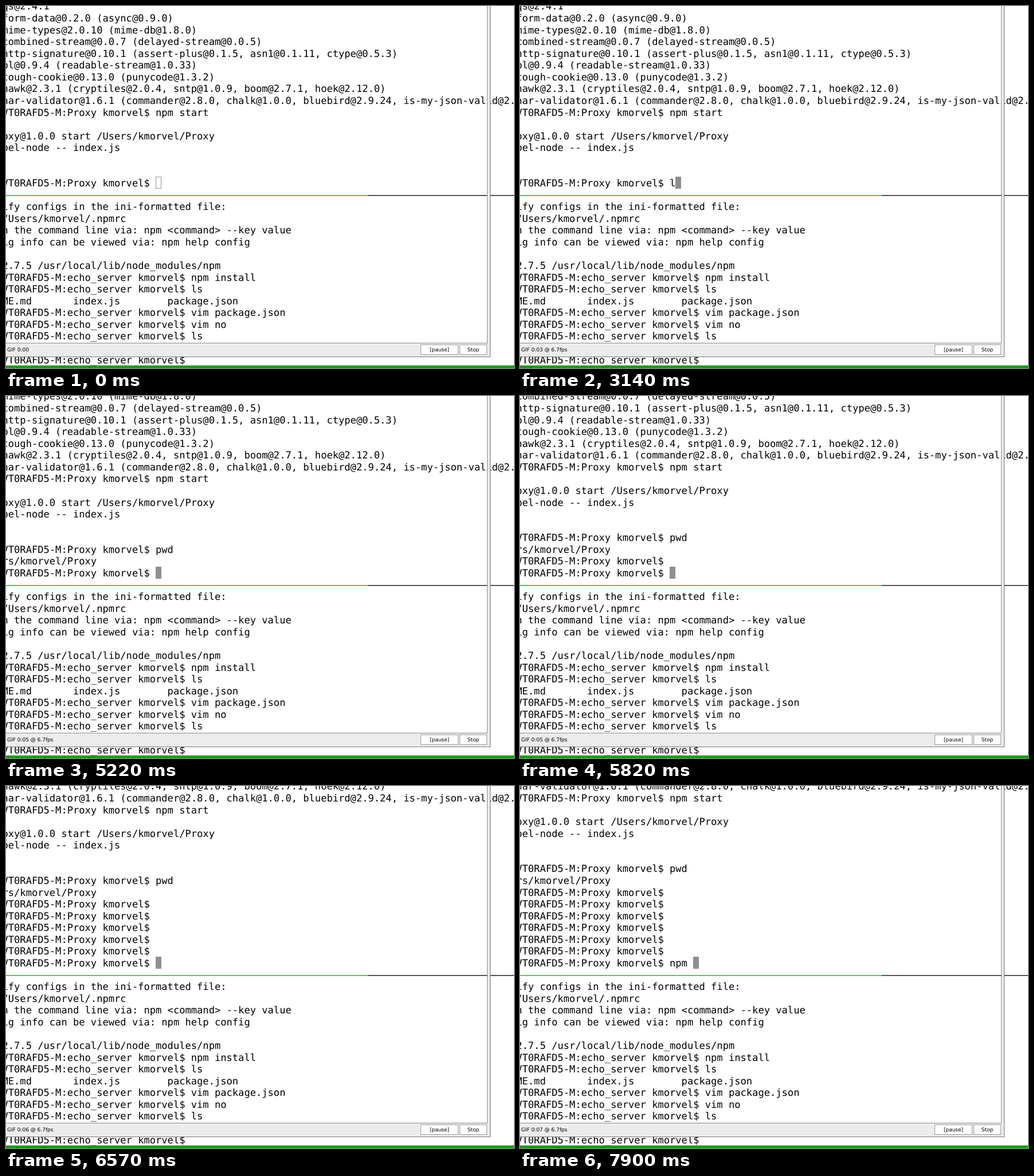
Animation, 886 px wide and 632 px high, one loop 8000 ms. Source, as an HTML page with a canvas:

```html
<!DOCTYPE html>
<html lang="en">
<head>
<meta charset="utf-8">
<title>Terminal recording</title>
<style>
  html, body { margin: 0; width: 100%; height: 100%; overflow: hidden; background: #fff; }
  canvas { display: block; width: 886px; height: 632px; }
</style>
</head>
<body>
<canvas id="stage" width="886" height="632"></canvas>
<script>
const ctx = document.getElementById('stage').getContext('2d');
const LOOP = 8000;
const CELL = 10.29, LINE = 20.57;   // terminal grid
const LEFT = -6.5, BASE = 315;      // first column, baseline of the input row

const USER = 'kmorvel';
const prompt = dir => `VT0RAFD5-M:${dir} ${USER}$ `;
const PROXY = prompt('Proxy'), ECHO = prompt('echo_server');

const history = [
  'qs@2.4.1',
  'form-data@0.2.0 (async@0.9.0)',
  'mime-types@2.0.10 (mime-db@1.8.0)',
  'combined-stream@0.0.7 (delayed-stream@0.0.5)',
  'http-signature@0.10.1 (assert-plus@0.1.5, asn1@0.1.11, ctype@0.5.3)',
  'bl@0.9.4 (readable-stream@1.0.33)',
  'tough-cookie@0.13.0 (punycode@1.3.2)',
  'hawk@2.3.1 (cryptiles@2.0.4, sntp@1.0.9, boom@2.7.1, hoek@2.12.0)',
  'har-validator@1.6.1 (commander@2.8.0, chalk@1.0.0, bluebird@2.9.24, is-my-json-valid@2.',
  PROXY + 'npm start',
  '',
  `oxy@1.0.0 start /Users/${USER}/Proxy`,
  'bel-node -- index.js',
  '',
  ''
];

const lowerPane = [
  'ify configs in the ini-formatted file:',
  `/Users/${USER}/.npmrc`,
  'n the command line via: npm <command> --key value',
  'ig info can be viewed via: npm help config',
  '',
  '2.7.5 /usr/local/lib/node_modules/npm',
  ECHO + 'npm install',
  ECHO + 'ls',
  'ME.md       index.js        package.json',
  ECHO + 'vim package.json',
  ECHO + 'vim no',
  ECHO + 'ls',
  '',
  ECHO
];

// [time, key]: '<' is backspace, '\n' is enter
const keys = [
  [3140, 'l'], [3290, 's'], [3740, '<'], [4190, '<'],
  [4780, 'p'], [4930, 'w'], [5070, 'd'], [5220, '\n'],
  [5820, '\n'], [6120, '\n'], [6270, '\n'], [6420, '\n'], [6570, '\n'], [6860, '\n'],
  [7310, 'n'], [7460, 'p'], [7600, 'm'], [7900, ' ']
];

function shellAt(t) {
  const lines = [...history];
  let input = '';
  for (const [time, key] of keys) {
    if (time > t) break;
    if (key === '<') input = input.slice(0, -1);
    else if (key === '\n') {
      lines.push(PROXY + input);
      if (input === 'pwd') lines.push(`rs/${USER}/Proxy`);
      input = '';
    } else input += key;
  }
  return { lines, input };
}

function rect(x, y, w, h, color) {
  ctx.fillStyle = color;
  ctx.fillRect(x, y, w, h);
}

function frame(x, y, w, h, color) {
  ctx.strokeStyle = color;
  ctx.lineWidth = 1;
  ctx.strokeRect(x + .5, y + .5, w - 1, h - 1);
}

function row(text, index) {
  ctx.font = '17.09px "DejaVu Sans Mono", monospace';
  ctx.textAlign = 'left';
  ctx.fillStyle = '#000';
  [...text].forEach((ch, col) => ctx.fillText(ch, LEFT + col * CELL, BASE + index * LINE));
}

function label(text, x, align) {
  ctx.font = '9px "DejaVu Sans", sans-serif';
  ctx.textAlign = align;
  ctx.fillStyle = '#000';
  ctx.fillText(text, x, 603);
}

function button(text, x, w) {
  rect(x, 591, w, 18, '#fff');
  frame(x, 591, w, 18, '#999');
  label(text, x + w / 2, 'center');
}

function drawTerminal(t) {
  const { lines, input } = shellAt(t);
  lines.slice(-15).forEach((line, i) => row(line, i - 15));
  row(PROXY + input, 0);

  const cursorX = Math.round(LEFT + (PROXY + input).length * CELL);
  if (t < 1490) frame(cursorX, 298, 10, 21, '#929292');
  else rect(cursorX, 298, 10, 21, '#8f8f8f');

  rect(0, 330, 631, 1.5, '#2db52d');
  rect(631, 330, 255, 1.5, '#222');
  lowerPane.forEach((line, i) => row(line, i + 2));
  rect(0, 627.5, 886, 5, '#08a408');
  row('] 0:bash- 1:node*', 16);
}

function drawRecorder(t) {
  rect(839, 0, 6, 613, '#ececec');
  rect(0, 588, 845, 25, '#ececec');
  rect(839, 0, 1, 589, '#8c8c8c');
  rect(844, 0, 1, 613, '#777');
  rect(0, 588, 840, 1, '#8c8c8c');
  rect(0, 612, 845, 1, '#777');

  const seconds = Math.floor((t + 5) / 1045);
  const rate = t < 300 ? '' : ` @ ${t < 1490 ? '6.8' : '6.7'}fps`;
  label(`GIF 0:0${seconds}${rate}`, 2, 'left');
  button('[pause]', 723, 66);
  button('Stop', 791, 48);
}

function draw(now) {
  const t = now % LOOP;
  ctx.textRendering = 'geometricPrecision';
  rect(0, 0, 886, 632, '#fff');
  drawTerminal(t);
  drawRecorder(t);
}

const start = performance.now();
function tick() {
  draw(performance.now() - start);
  requestAnimationFrame(tick);
}
tick();
</script>
</body>
</html>
```
